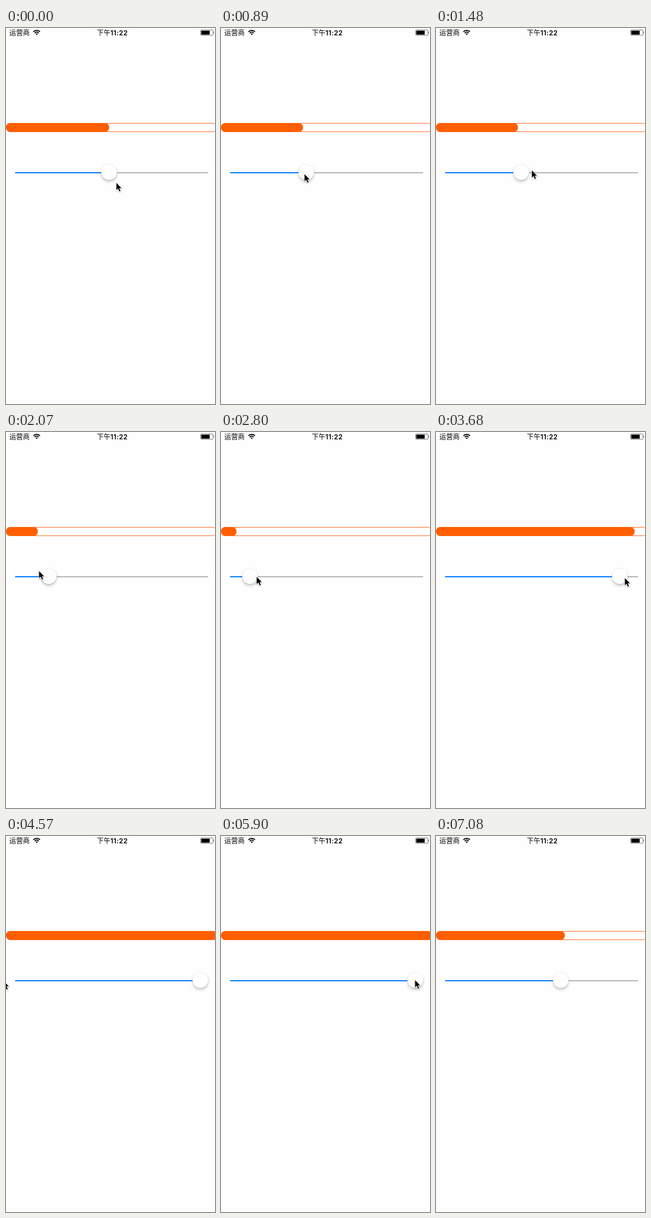
Write an HTML page that moves like this. It is 371 px wide and 665 px high and loops after 7560 ms.

```html
<!DOCTYPE html>
<html lang="zh">
<head>
<meta charset="utf-8">
<title>Slider and progress bar</title>
<style>
  html, body { margin: 0; width: 100%; height: 100%; overflow: hidden; background: #fefefe; }
  svg { display: block; width: 371px; height: 665px; }
  text { font: 12px "Inter", "Noto Sans CJK SC", "Noto Sans CJK", sans-serif; }
  .clock { font-weight: 500; text-anchor: middle; }
  .digits { font-weight: 600; letter-spacing: .35px; }
  #thumb {
    filter: drop-shadow(0 1px .5px rgba(0, 0, 0, .13))
            drop-shadow(0 3px 2.5px rgba(0, 0, 0, .18));
  }
  #cursor { filter: drop-shadow(0 1px 1px rgba(0, 0, 0, .3)); }
</style>
</head>
<body>
<svg viewBox="0 0 371 665">
  <text x="6" y="13">运营商</text>
  <g fill="none" stroke="#000" stroke-width="1.9">
    <path d="M48.6 6.6 A8.4 8.4 0 0 1 60.4 6.6"/>
    <path d="M51 9 A5 5 0 0 1 58 9"/>
  </g>
  <path d="M54.5 12.6 L52.6 10.6 A2.7 2.7 0 0 1 56.4 10.6 Z"/>
  <text class="clock" x="188.7" y="13">下午<tspan class="digits">11:22</tspan></text>
  <rect x="345.4" y="3.5" width="22.2" height="9.4" rx="1.6" fill="none" stroke="#555" stroke-width=".8"/>
  <rect x="346.6" y="4.7" width="15" height="7" rx=".6"/>
  <path d="M368.4 6.3 Q370 8.1 368.4 9.9 Z"/>

  <rect x=".5" y="168.5" width="374" height="15" rx="7.5" fill="none" stroke="#ff6a28"/>
  <rect id="bar" y="168" height="16" rx="7.5" fill="#ff5e00"/>

  <rect x="16" y="255" width="343" height="2" rx="1" fill="#b5b5b5"/>
  <rect id="track" x="16" y="255" height="2" rx="1" fill="#007aff"/>
  <circle id="thumb" cy="255" r="14" fill="#fefefe" stroke="#000" stroke-opacity=".12" stroke-width=".5"/>

  <path id="cursor" d="M1 0 V12.5 L4 9.8 L6.2 15 L8.2 14.1 L6 9.2 H10 Z"
        stroke="#fff" stroke-width="1.8" paint-order="stroke"/>
</svg>
<script>
const LOOP = 7560, STEP = 147.5, LAST = 48;
const MIN_X = 30, MAX_X = 345;
const LEAD = 0.35;  // the thumb trails the pointer by this part of a step

// Turning points as [step, value]; the motion eases from one to the next.
const drag = [
  [2, 183], [9.2, 129], [11.3, 199], [15.45, MIN_X],
  [17.5, MIN_X], [26.4, MAX_X], [40, MAX_X], [45, 221.5]
];
const wander = [[26, 366], [27.4, 400], [31.8, -40], [33.5, -40], [36, 300], [37, 300], [40, MAX_X]];
const height = [[2, 265], [10, 252], [14, 246], [22, 261], [27, 257], [40, 255]];

function ease(points, step) {
  const next = points.findIndex(point => point[0] > step);
  if (next < 0) return points.at(-1)[1];
  if (next === 0) return points[0][1];
  const [[t0, from], [t1, to]] = points.slice(next - 1, next + 1);
  const turn = Math.PI * (step - t0) / (t1 - t0);
  return from + (to - from) * (1 - Math.cos(turn)) / 2;
}

function pointerAt(step) {
  if (step < 3) {
    const approach = Math.min(step, 1);
    return [195 - 9 * approach, 274 - 9 * approach];
  }
  if (step > 46) return [317 + 95 * (step - 47), 611];
  const path = step >= 26 && step < 40 ? wander : drag;
  return [ease(path, path === drag ? step + LEAD : step), ease(height, step)];
}

const [bar, track, thumb, cursor] =
  ["bar", "track", "thumb", "cursor"].map(id => document.getElementById(id));

function draw(now) {
  // The screen refreshes only once per step.
  const step = Math.min(LAST, Math.floor((now % LOOP + 8) / STEP));
  const x = ease(drag, step);
  const value = (x - MIN_X) / (MAX_X - MIN_X);
  bar.setAttribute("width", 2 + 373 * value);
  track.setAttribute("width", x - 16);
  thumb.setAttribute("cx", x);
  cursor.setAttribute("transform", `translate(${pointerAt(step)})`);
}

const start = performance.now();
function tick() {
  draw(performance.now() - start);
  requestAnimationFrame(tick);
}
tick();
</script>
</body>
</html>
```
